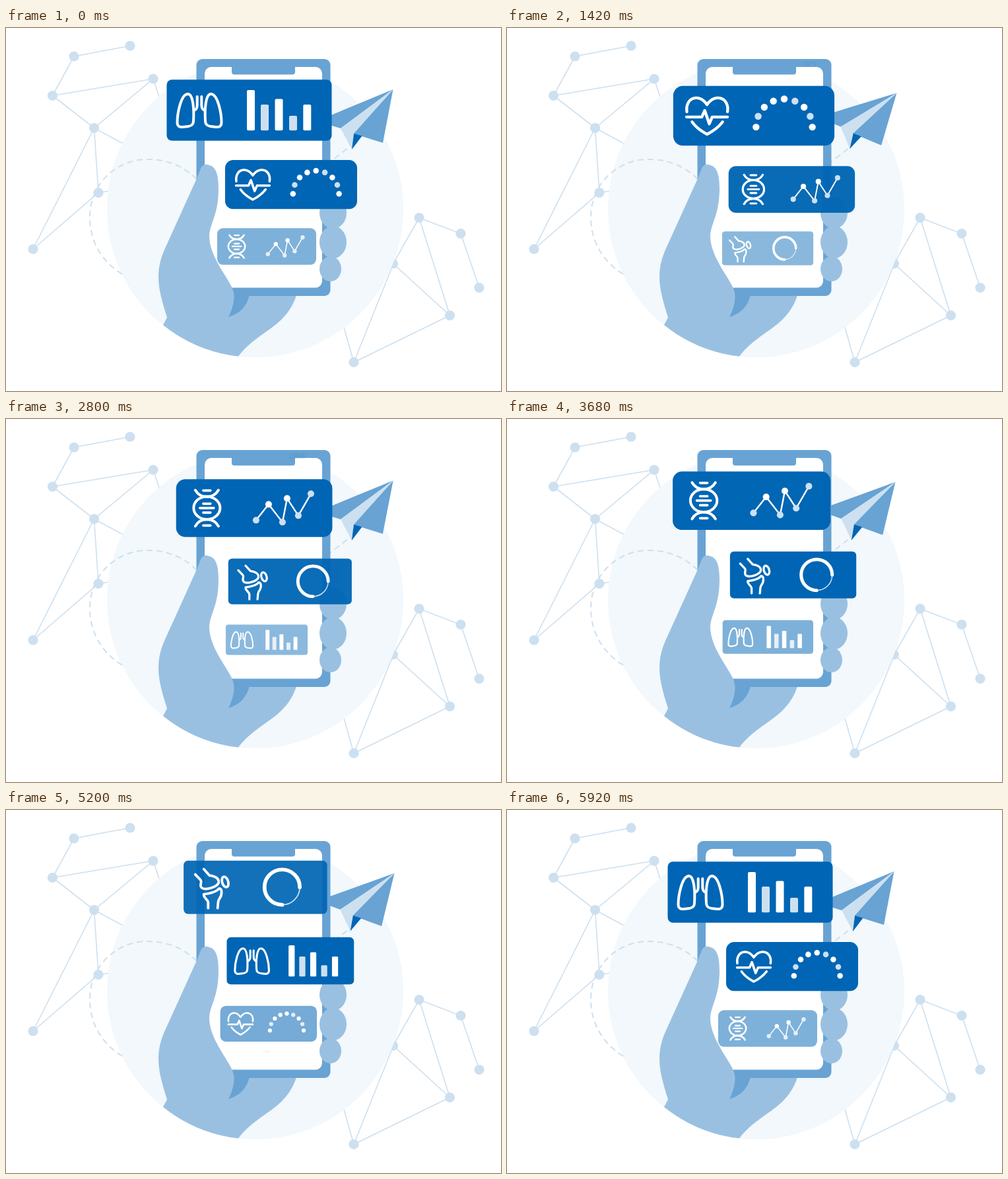
Write an HTML page that moves like this. It is 750 px wide and 550 px high and loops after 5940 ms.

```html
<!DOCTYPE html>
<html lang="en">
<head>
<meta charset="utf-8">
<title>Health cards on a phone</title>
<style>
  html, body { margin: 0; width: 100%; height: 100%; overflow: hidden; background: #fff; }
  svg { display: block; width: 750px; height: 550px; }
  .net { fill: #cde0f0; }
  .net path, .dash { fill: none; stroke: #cde0f0; stroke-width: 1.6; }
  .dash { stroke-width: 2; stroke-dasharray: 9 6; }
  .card { fill: #fff; }
  .card rect.bg { fill: #0065b4; }
  .line { fill: none; stroke: #fff; stroke-width: 4; stroke-linecap: round; stroke-linejoin: round; }
  .pale { fill: #cde0f0; }
  .skin { fill: #9ac0e1; }
  .mid { fill: #68a3d4; }
</style>
</head>
<body>
<svg viewBox="0 0 750 550">
  <g class="net" id="net">
    <path d="M188 27L103 43L70.5 102.5L223 77L133.5 151.5L70.5 102.5M133.5 151.5L140 249.5L41 335L133.5 151.5L181 177M140 249.5L160 246.5M223 77L234 110"/>
    <path d="M717 393.5L689 311.5L626 287.5L586.5 357L672.5 435.5L626 287.5M672.5 435.5L527 506.5L587 357M527 506.5L511 450"/>
  </g>
  <circle cx="377.5" cy="274.5" r="224.5" fill="#f2f8fb"/>
  <path class="dash" d="M289 229C268 208 242 199 215 199C165 199 127 238 127 287C127 325 147 356 178 374"/>
  <path class="dash" d="M486 207L519 181"/>

  <g id="plane">
    <path class="mid" d="M586.5 93L471 141L507 152ZM586.5 93L571 174L526 160Z"/>
    <path class="pale" d="M586.5 93L507 152L524 184L527 160Z"/>
    <path fill="#0065b4" d="M527 160L539.5 163.5L524 184Z"/>
  </g>

  <path class="skin" d="M300 400H441.5C434 428 418 443 400 456C380 470 362 483 352 497.6Z"/>
  <rect class="mid" x="288.5" y="47" width="203" height="359" rx="9"/>
  <rect x="301" y="59" width="178" height="334.5" rx="10" fill="#fff"/>
  <rect class="mid" x="342" y="50" width="96" height="20.5" rx="4"/>
  <path class="mid" d="M340 404H369C365 422 354 433 337 438Z"/>
  <path class="skin" d="M289 228L295 213C298 206 304 206 308 208C319 210 322 225 322 243C322 285 308 296 308 317C309 338 322 359 332 375C339 387 346 396 345.5 408C345 420 341 430 337 438L352 497.6A224.5 224.5 0 0 1 238 450L244 438.5C236 413 231 395 231 377C231 362 234 350 240 336Z"/>
  <g class="skin">
    <ellipse cx="495.5" cy="280" rx="20.5" ry="24"/>
    <ellipse cx="495.5" cy="324.5" rx="20.5" ry="24.5"/>
    <ellipse cx="491.5" cy="365" rx="16.5" ry="19"/>
  </g>
  <g id="cards"></g>
</svg>
<script>
const LOOP = 5940, FIRST = 782, STEP = 1395, MOVE = 875;
const $ = id => document.getElementById(id);
const line = (d, w = 4) => `<path class="line" style="stroke-width:${w}" d="${d}"/>`;
const dot = (x, y, r, pale) => `<circle cx="${x}" cy="${y}" r="${r}"${pale ? ' class="pale"' : ''}/>`;

$('net').innerHTML += [[188, 27], [103, 43], [70.5, 102.5], [223, 77], [133.5, 151.5], [140, 249.5], [41, 335],
  [626, 287.5], [689, 311.5], [717, 393.5], [672.5, 435.5], [527, 506.5], [586.5, 357]]
  .map(([x, y]) => dot(x, y, 7.6)).join('');

const lung = line('M284 141C285 125 284 100 275.5 100C265 100 259.5 130 259.5 143C259.5 152 267 150 272 149.5C280 149 284 147 284 141Z')
  + line('M289.7 104V117Q289.7 123 285 125');
const bars = [[365, 94], [386, 116], [407.5, 107.5], [429, 133], [450.3, 116]]
  .map(([x, y], i) => `<rect x="${x}" y="${y}" width="12" height="${155.3 - y}" rx="2"${i % 2 ? ' class="pale"' : ''}/>`).join('');

let dial = '';
for (let i = 0; i < 9; i++) {
  const a = Math.PI * i / 8;
  dial += dot(415.75 - 43.3 * Math.cos(a), 141.5 - 43.3 * Math.sin(a), 5.3, [1, 5, 7].includes(i));
}
const trend = [[379, 153.5], [398, 129.5], [419, 156.5], [426, 120.5], [443, 146.5], [462, 113.5]];

// c: centre and size of the drawing; w: width and x, y: centre at the slots enter, low, mid, top, leave
const path = top => [369, 331, 237.2, top, 49];
const cards = [
  { c: [368.5, 124.5, 250, 92.7], r: 8, w: [0, 137, 188, 250, 0], x: [395, 395, 436, 368.5, 466], y: path(124.5),
    art: lung + `<g transform="translate(586 0) scale(-1 1)">${lung}</g>` + bars },
  { c: [369, 124.2, 248, 92], r: 15, w: [0, 142, 200, 248, 0], x: [395, 395, 432, 369, 448.5], y: path(124.2),
    art: line('M266 118C263 97 284 88 297 107C310 88 332 97 328.5 118', 4.4)
      + line('M265.5 126H289L293.5 116L300.5 136.5L305 126H328.5', 4.4)
      + line('M274 133.5C282 145 291 149 297 152.5C304 149 313 144 321 133.5', 4.4) + dial },
  { c: [376.2, 135.2, 236.5, 87.5], r: 14, w: [0, 150, 195, 241, 0], x: [395, 395, 434.5, 370, 448.5], y: path(124.4),
    art: line('M287 108C291 115 297 118 304.5 118C312 118 318 115 322 108M287 162.5C291 155 297 152.5 304.5 152.5C312 152.5 318 155 322 162.5')
      + '<ellipse class="line" cx="304.5" cy="135" rx="20" ry="17.3"/>'
      + line('M299 108.5H310M299 161.5H310M299 128.5H310M294 135H315M299 142H310', 3.6)
      + line('M' + trend.join('L'), 2.4)
      + trend.map(([x, y], i) => dot(x, y, 5, i != 1 && i != 3)).join('') },
  { c: [380, 139, 228, 84.5], r: 7, w: [0, 150, 191, 235.5, 0], x: [395, 395, 434, 372, 448.5], y: path(122.8),
    art: line('M284.5 118.5L293 127.5C296 131 290 136 295 140C302 144.5 319 138 321.5 132C323 125 316 121 307 120L298 110')
      + '<ellipse class="line" cx="332" cy="130.5" rx="4.8" ry="8.5" transform="rotate(-17 332 130.5)"/>'
      + line('M305 172V163C304 157 297 156 298 150C306 149 318 147 322 141C328 140 327 152 323 157C320 160 321 165 320 172')
      + '<circle cx="422.5" cy="138.8" r="28" fill="none" stroke="#cde0f0" stroke-width="1.8"/>'
      + line('M450.5 138.8A28 28 0 1 0 422.5 166.8', 6) }
];
const alpha = [0, .5, 1, 1, 0];

$('cards').innerHTML = cards.map(({ c: [x, y, w, h], r, art }) =>
  `<g class="card"><rect class="bg" x="${x - w / 2}" y="${y - h / 2}" width="${w}" height="${h}" rx="${r}"/>${art}</g>`).join('');
const groups = [...$('cards').children];

const ease = u => u <= 0 ? 0 : u >= 1 ? 1 : u < .5 ? 4 * u ** 3 : 1 - 4 * (1 - u) ** 3;
const at = (list, v) => {
  const i = Math.min(3, Math.floor(v));
  return list[i] + (list[i + 1] - list[i]) * (v - i);
};

function draw(t) {
  let moved = 0;
  for (let k = 0; k < 4; k++) moved += ease((t - FIRST - k * STEP) / MOVE);
  cards.forEach(({ c, w, x, y }, i) => {
    const v = (moved + 3 - i) % 4;
    groups[i].setAttribute('transform',
      `translate(${at(x, v)} ${at(y, v)}) scale(${at(w, v) / c[2]}) translate(${-c[0]} ${-c[1]})`);
    groups[i].setAttribute('opacity', at(alpha, v));
  });
  const tilt = 2.8 * (1 - Math.cos(4 * Math.PI * t / LOOP));
  $('plane').setAttribute('transform', `rotate(${tilt} 531 136)`);
}

const start = performance.now();
function tick(now) {
  draw(Math.max(0, now - start) % LOOP);
  requestAnimationFrame(tick);
}
draw(0);
requestAnimationFrame(tick);
</script>
</body>
</html>
```
